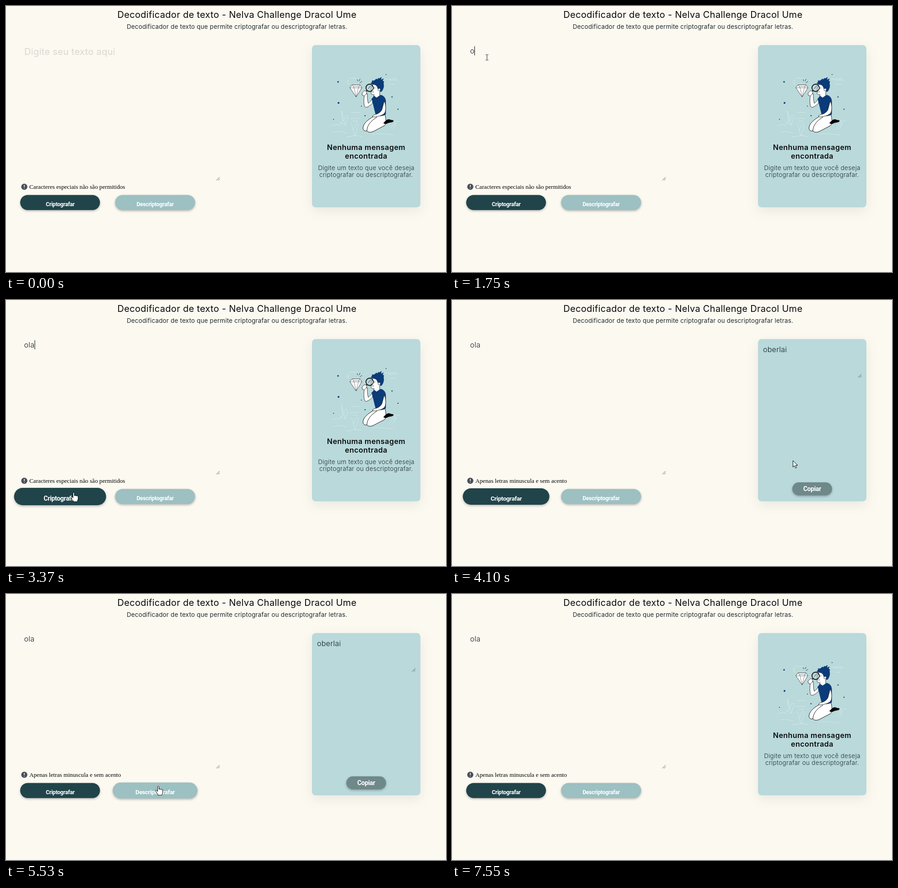
Recreate the animation shown at these times as an HTML page. Size 962 px wide and 582 px high, loop 8080 ms.

```html
<!DOCTYPE html>
<html lang="pt-BR">
<head>
<meta charset="utf-8">
<title>Decodificador de texto</title>
<style>
html, body { margin: 0; width: 100%; height: 100%; overflow: hidden; background: #fcf9f1; }
svg { display: block; width: 100vw; height: 100vh; }
text { font-family: Inter, sans-serif; fill: #0a0a0a; }
.mid { text-anchor: middle; }
.title { font-size: 20px; letter-spacing: .3px; }
.body { font-size: 13.4px; letter-spacing: .21px; fill: #202a2d; }
.tip { font-weight: 300; letter-spacing: .36px; }
.head { font-size: 16px; font-weight: 600; letter-spacing: .45px; }
.hint { font-size: 20px; letter-spacing: .3px; fill: #d9d7d0; }
.typed { font-size: 16px; font-weight: 300; letter-spacing: .25px; fill: #101c22; }
.note { font: 13.2px "Liberation Serif", serif; fill: #000; }
.label { font: 700 12.3px Roboto, sans-serif; letter-spacing: -.35px; fill: #fff; text-anchor: middle; }
.copy { font-size: 14px; letter-spacing: -.4px; }
.btn rect { filter: drop-shadow(0 2px 2.5px rgba(0,0,0,.27)); }
.card { filter: drop-shadow(0 8px 13px rgba(0,0,0,.07)); }
.grip { stroke: #555; stroke-width: 1; fill: none; }
.ink { stroke: #111; stroke-width: 1; stroke-linejoin: round; stroke-linecap: round; }
</style>
</head>
<body>
<svg viewBox="0 0 962 582">
  <rect width="962" height="582" fill="#fcf9f1"/>
  <text class="title mid" x="505" y="26">Decodificador de texto - Nelva Challenge Dracol Ume</text>
  <text class="body mid" x="505" y="50">Decodificador de texto que permite criptografar ou descriptografar letras.</text>

  <text id="hint" class="hint" x="40" y="107">Digite seu texto aqui</text>
  <text id="typed" class="typed" x="39.5" y="104"></text>
  <rect id="caret" y="88" width="1" height="20" fill="#000"/>
  <path class="grip" d="M460 381.5l7-7M464 381.5l3-3"/>

  <circle cx="40" cy="395.5" r="6.7" fill="#495057"/>
  <path d="M40 391.6v4.4M40 398v1.3" stroke="#fff" stroke-width="1.6"/>
  <text id="note" class="note" x="51" y="400"></text>

  <rect class="card" x="669" y="85.5" width="237" height="355" rx="8" fill="#b9d9db"/>

  <g id="empty">
    <g fill="none" stroke="#d3e7e8" stroke-width="1">
      <path d="M829 160h12l4-2M836 162h22M845 159h9M838 171h13M745 166l3-5 2 5-2 6zM750 158h20"/>
      <path d="M733 228l9 33 6-18-4-5-7 14M733 228l3 24-6 8M742 261l-12-7M754 233h21M752 246h20M757 252h12"/>
      <path d="M755 257l8 28 8-25-4-4-8 16M711 262l12-3 8 3M717 276l13-2 16 4M743 287l22-4 14 3"/>
      <path d="M800 281l18-2 30 3M838 270l12-15 4 3-8 12M846 252h17M848 264l5-9"/>
    </g>
    <g id="dots" fill="#0b3b78"></g>
    <g class="ink" fill="#fff">
      <path d="M757 172.5h17l4 6.5-12.5 20-13.500-20z" stroke-width=".7"/>
      <path d="M752 179h26M757 172.5l4 6.5 4.500 20 5-20 3-6.5M759 176h14" fill="none" stroke-width=".5"/>
      <path d="M769 164l-1-3M772 164l2-4M774 168l4-3" fill="none" stroke-width=".8"/>
      <path d="M813 238c-13 4-27 14-31 23-4 9 1 14 7 12 2 4 10 4 15 1l23-12c5-4 4-14 2-23z"/>
      <path d="M811 243c-12 7-22 18-22 30" fill="none"/>
      <path d="M826 256c5-7 10-9 14-7 4 2 7 0 7 3-2 3-10 2-14 5-4 1-6 1-7-1z" fill="#000"/>
      <path d="M801 202c-2 5-6 9-9 11-2-8-2-15-2-21l-6 1c-2 10-2 20 0 27 3 4 10 0 17-7z" stroke-width=".8"/>
      <path d="M802 172c-3 4-4 9-3 14l-1 5c1 3 4 3 7 3l-2 6 8 3 6-7 0-8 5-6-2-9-10-5z" stroke-width=".8"/>
      <path d="M800 203l5-6 5 4 9-6c6 1 10 5 11 12l0 30c-6 4-14 4-21 2-3-11-6-24-9-36z" fill="#0b3b78" stroke="#0b3b78"/>
      <path d="M827 208c4 8 4 20 1 26-4 5-12 7-18 8l-6 1-3-2 4-3 7-2c6-3 10-7 11-13z" stroke-width=".8"/>
      <path d="M798 169c2-1 3-4 3-6 2 1 4 1 6-1 1-2 4-3 6-1l1-3 2 1 5-3-2 5 3 0 3-2-2 5 3 1-1 4c2 6 0 13-4 18l-3 0-1-7-4 1c-1-5-4-9-8-9-3-1-5-1-7-3z" fill="#0b3b78" stroke="#0b3b78"/>
      <circle cx="816" cy="183" r="2.8" stroke-width=".7"/>
      <path d="M803 180l4-1M801 188l3 0M792 181l5-6" fill="none" stroke-width=".8"/>
      <path d="M789 185l-7 8" stroke-width="2"/>
      <path d="M779 190l5-5 5 2-1 5-5 5-4-2z" stroke-width=".8"/>
      <circle cx="795" cy="179" r="8" fill="none" stroke-width="1.8"/>
    </g>
    <text class="head mid" x="787.5" y="315">Nenhuma mensagem</text>
    <text class="head mid" x="787.5" y="334">encontrada</text>
    <text class="body tip mid" x="787.5" y="358.5">Digite um texto que você deseja</text>
    <text class="body tip mid" x="787.5" y="374">criptografar ou descriptografar.</text>
  </g>

  <g id="result">
    <text class="typed" x="680" y="114">oberlai</text>
    <path class="grip" d="M888 169.5l7-7M892 169.5l3-3"/>
    <g id="copy" class="btn">
      <rect x="744" y="399" width="87" height="28.5" rx="14.2" fill="#6f888a"/>
      <text class="label copy" x="787.5" y="418">Copiar</text>
    </g>
  </g>

  <g id="enc" class="btn">
    <rect x="31" y="413.5" width="174.5" height="33" rx="16.5" fill="#20444a"/>
    <text class="label" x="118.5" y="438">Criptografar</text>
  </g>
  <g id="dec" class="btn">
    <rect x="238.5" y="413.5" width="175" height="33" rx="16.5" fill="#9dc0c2"/>
    <text class="label" x="326" y="438">Descriptografar</text>
  </g>

  <circle id="press" r="10" fill="#ff0" opacity=".47"/>
  <g id="cursor">
    <path id="arrow" d="M.5.5v14l3.300-3 2.400 5.300 2.300-1-2.300-5.200h4.500z" fill="#fff" stroke="#000"/>
    <path id="beam" d="M-3-6h2.200L0-5.200.8-6H3M0-5.500v11M-3 6h2.200L0 5.200.8 6H3" fill="none" stroke="#222"/>
    <path id="hand" d="M-1.500 1c0-2 3-2 3 0v5.500c.5-1.500 2.800-1.300 2.900.3.600-1.300 2.700-1 2.800.5.700-1.100 2.500-.7 2.500.9v4c0 3-1.700 4-1.700 7H-.5c0-2-2-3.500-3.300-6L-6 10c-.7-1.800 1.500-2.400 2.700-.8l1.800 2z" fill="#fff" stroke="#000" stroke-linejoin="round"/>
  </g>
</svg>
<script>
const LOOP = 8080;
const $ = id => document.getElementById(id);
const show = (id, on) => $(id).setAttribute("visibility", on ? "visible" : "hidden");
const within = (t, a, b) => t >= a && t < b;

// Pointer routes as [time, x, y]; the pointer is hidden between 7550 and 130.
const route = [
  [130, 645, 440], [400, 400, 300], [650, 130, 145], [810, 76.5, 112.5],
  [2470, 76.5, 112.5], [2800, 209, 420], [2960, 204, 505], [3080, 190, 512], [3300, 148, 422],
  [3910, 148, 422], [4100, 745, 351], [4330, 914, 432], [4480, 848, 432], [4650, 802, 416],
  [5130, 802, 416], [5470, 412, 425], [5530, 333, 421], [5880, 334, 433],
  [6940, 334, 433], [7550, 907, 590]
];

const buttons = {
  enc: { x: 118.5, y: 430, w: 175, h: 33, hover: [3230, 4000] },
  dec: { x: 326, y: 430, w: 175, h: 33, hover: [5470, 7020] },
  copy: { x: 787.5, y: 413.25, w: 87, h: 28.5, hover: [4510, 5175] }
};

const clicks = [[940, 1070], [3500, 3630], [4790, 4930], [6210, 6350]];
const keys = [[1750, "o", 49.5], [1870, "ol", 53.5], [2140, "ola", 63]];

$("dots").innerHTML = [
  [726, 166, 1.7], [727, 212, 2], [716, 248, 1], [831, 150, 1], [844, 199, 1.3],
  [857, 226, 1.2], [777, 219, 1], [785, 240, 1.3]
].map(([x, y, r]) => `<circle cx="${x}" cy="${y}" r="${r}"/>`).join("");

// CSS "ease": cubic-bezier(.25, .1, .25, 1)
function ease(p) {
  if (p <= 0) return 0;
  if (p >= 1) return 1;
  let lo = 0, hi = 1, s = .5;
  for (let i = 0; i < 20; i++) {
    s = (lo + hi) / 2;
    const x = .75 * s * (1 - s) + s ** 3;
    if (x < p) lo = s; else hi = s;
  }
  return .3 * s * (1 - s) ** 2 + 3 * s * s * (1 - s) + s ** 3;
}

function pointer(t) {
  const i = route.findIndex(p => p[0] > t);
  if (i < 1) return null;
  const [t0, x0, y0] = route[i - 1], [t1, x1, y1] = route[i];
  const k = (t - t0) / (t1 - t0);
  return { x: x0 + (x1 - x0) * k, y: y0 + (y1 - y0) * k };
}

function drawButtons(t) {
  for (const [id, b] of Object.entries(buttons)) {
    const [on, off] = b.hover;
    const s = 1 + .2 * (ease((t - on) / 300) - ease((t - off) / 300));
    $(id).setAttribute("transform", `translate(${b.x} ${b.y}) scale(${s}) translate(${-b.x} ${-b.y})`);
  }
}

function drawTyping(t) {
  const key = keys.filter(k => k[0] <= t).pop();
  const since = key ? key[0] : 940;
  show("hint", !key);
  $("typed").textContent = key ? key[1] : "";
  $("caret").setAttribute("x", key ? key[2] - .5 : 39);
  show("caret", within(t, 940, 3500) && Math.floor((t - since) / 530) % 2 === 0);
}

function drawPointer(t, encoded) {
  const p = pointer(t);
  show("press", p && clicks.some(([a, b]) => within(t, a, b)));
  let kind = "";
  if (p) {
    const over = Object.entries(buttons).some(([id, b]) => (id !== "copy" || encoded) &&
      Math.abs(p.x - b.x) < b.w / 2 && Math.abs(p.y - b.y) < b.h / 2);
    const typing = p.x > 31 && p.x < 467 && p.y > 85 && p.y < 382;
    kind = over ? "hand" : typing ? "beam" : "arrow";
    const at = `translate(${p.x} ${p.y})`;
    $("cursor").setAttribute("transform", at);
    $("press").setAttribute("transform", at);
  }
  for (const id of ["arrow", "beam", "hand"]) show(id, id === kind);
}

function draw(t) {
  const encoded = within(t, 3630, 6350);
  show("empty", !encoded);
  show("result", encoded);
  $("note").textContent = t < 3630
    ? "Caracteres especiais não são permitidos"
    : "Apenas letras minuscula e sem acento";
  drawTyping(t);
  drawButtons(t);
  drawPointer(t, encoded);
}

let start;
function tick(now) {
  start ??= now;
  draw((now - start) % LOOP);
  requestAnimationFrame(tick);
}
draw(0);
requestAnimationFrame(tick);
</script>
</body>
</html>
```
